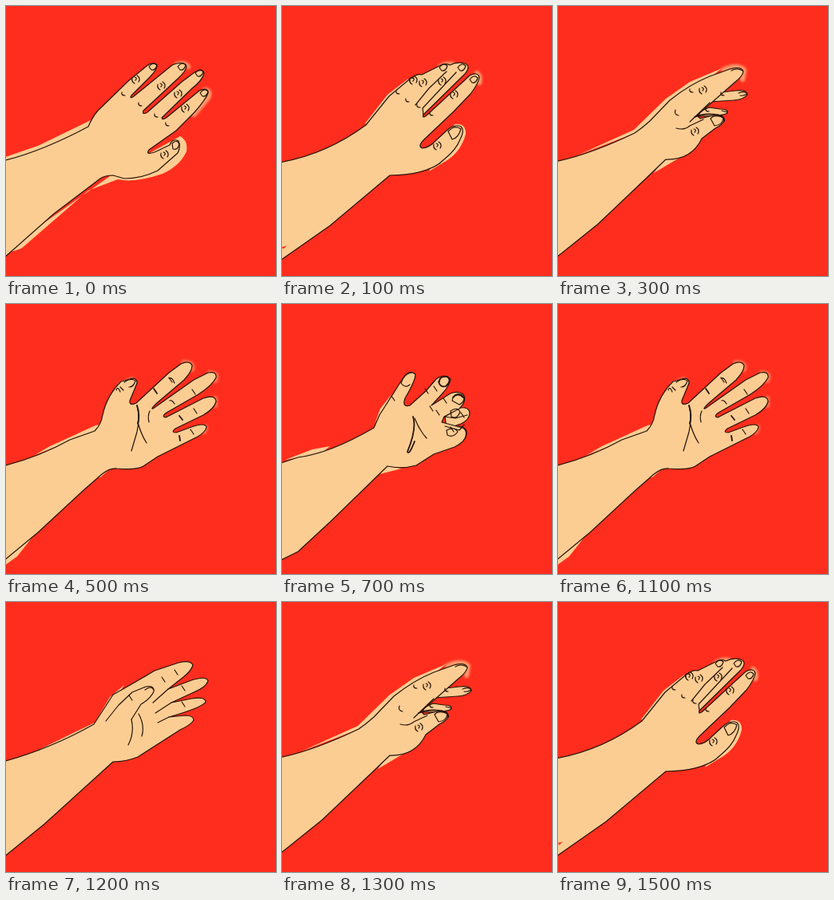
Write an HTML page without scripts that moves like this. It is 338 by 338 pixels and loops after 1600 ms.

```html
<!DOCTYPE html>
<html lang="en">
<head>
<meta charset="utf-8">
<title>Turning hand</title>
<style>
  html, body { margin: 0; width: 100%; height: 100%; overflow: hidden; background: #ff2d1d; }
  .strip { display: flex; width: 3042px; animation: play 1.6s steps(8) infinite; }
  /* nine poses, there and back */
  @keyframes play { 50% { transform: translateX(-2704px); } }
  .strip svg { flex: none; width: 338px; height: 338px; }
  .defs { position: absolute; width: 0; height: 0; }
  path { fill: none; stroke: #26130a; stroke-width: 1.2; stroke-linejoin: round; stroke-linecap: round; }
  marker { overflow: visible; }
  .skin { fill: #fccd93; }
  .spill { fill: #fccd93; stroke: none; filter: blur(.7px); }
  .glow { stroke: #fccd93; stroke-width: 6; opacity: .7; filter: blur(1.4px); }
  .bold { stroke-width: 1.8; }
  .wrinkles, .knuckles, .nails, .ticks { stroke: none; marker: var(--mark); }
  .wrinkles { --mark: url(#wrinkle); }
  .knuckles { --mark: url(#knuckle); }
  .nails { --mark: url(#nail); }
  .ticks { --mark: url(#tick); }
</style>
</head>
<body>
<svg class="defs">
  <marker id="wrinkle" markerUnits="userSpaceOnUse"><path d="M-4-2q-1 5 3 7M-1-3q4 1 1 4M2-5q5 3 2 8"/></marker>
  <marker id="knuckle" markerUnits="userSpaceOnUse"><path d="M-2-2q-1 4 4 4"/></marker>
  <marker id="nail" markerUnits="userSpaceOnUse"><path d="M-5 0Q0-7 5-2 3 5-2 4Z"/></marker>
  <marker id="tick" markerUnits="userSpaceOnUse"><path d="M-2-3l4 6"/></marker>
</svg>

<div class="strip">
  <!-- back of the hand, fingers spread -->
  <svg>
    <path class="spill" d="M-4 190L40 175 106 143V158L0 198ZM218 163Q228 168 226 182 218 200 196 210 160 222 140 217L103 231 20 303Q10 308-4 308L140 206Z"/>
    <path class="glow" d="M214 73Q224 70 228 76M249 105Q257 106 253 115L235 136"/>
    <path class="skin" d="M-4 194Q45 182 103 151 108 139 115 131L153 94 175 76Q183 69 189 74 189 80 180 89L157 112Q154 117 160 113L208 74Q222 68 226 75 226 81 215 91L172 131Q170 137 177 133L220 95 236 83Q246 78 248 84 246 93 233 103L195 140Q196 144 203 138L242 106Q253 101 253 109 250 117 236 133L213 156 179 180Q174 187 186 183L205 174Q208 165 216 169 219 176 215 184L190 206Q170 216 148 216L134 212Q124 212 118 216L60 260 0 313-4 316Z"/>
    <path class="nails" d="M184 76L220 76 242 84 248 109"/>
    <path d="M208 172Q214 166 217 173 215 181 209 179Z"/>
    <path class="wrinkles" d="M162 92L194 100 215 110 224 128 198 186"/>
    <path class="knuckles" d="M147 110L168 123 188 137 202 148"/>
  </svg>

  <!-- back of the hand, fingers closing -->
  <svg>
    <path class="spill" d="M104 147L132 111 158 91 160 100 112 150ZM216 148Q230 146 230 160 224 184 202 196L184 207Z"/>
    <path class="glow" d="M198 76Q206 71 214 73M244 84Q249 88 247 96"/>
    <path class="skin" d="M-4 196Q55 186 105 149L134 113 158 93Q168 84 175 86L197 75Q204 71 210 74 220 69 229 72 237 75 229 85L177 136Q175 142 182 136L235 87Q245 82 247 89 246 97 236 110L215 132 178 167Q169 176 176 178 185 177 193 168L206 156Q216 147 224 151 229 155 223 167 218 180 203 192 185 211 135 212L60 275 0 317-4 319Z"/>
    <path class="nails" d="M202 77L225 77 240 92"/>
    <path d="M208 157Q216 148 224 154 221 165 213 167ZM167 124L184 103 206 82M177 136L176 128 218 83M160 94Q158 89 165 90"/>
    <path class="wrinkles" d="M164 93L176 96 200 94 215 111 194 175"/>
    <path class="knuckles" d="M145 108L157 118 171 125 187 135"/>
    <path d="M-1 302L6 300 2 304Z" style="fill:#ff2d1d;stroke:none"/>
  </svg>

  <!-- turning edge-on -->
  <svg>
    <path class="spill" d="M70 169L104 147 135 113 165 95 105 155ZM212 142Q222 144 218 155L198 178 184 187Z"/>
    <path class="skin" d="M-4 196Q55 182 103 152L137 114 163 96 214 75Q229 70 234 77 234 82 219 98L234 93Q244 91 243 97 240 105 226 114L190 141 174 159Q169 166 178 163L205 143Q216 140 218 147 216 158 203 170L184 188Q160 203 136 202L56 273 0 315-4 318Z"/>
    <path class="nails" d="M227 79L238 97 211 149"/>
    <path d="M226 90L178 132"/>
    <path class="wrinkles" d="M168 100L193 94 187 167"/>
    <path class="knuckles" d="M149 124L160 131"/>
  </svg>

  <!-- edge-on, thumb in front -->
  <svg>
    <path class="spill" d="M24 187L95 155 135 116 165 95 205 78 112 153ZM132 192L152 190 120 209Z"/>
    <path class="glow" d="M207 80Q224 72 233 80L231 92"/>
    <path class="skin" d="M180 119L204 108 222 106Q236 104 237 111 233 117 220 118L189 120ZM178 132L189 127 203 129Q213 129 212 134 207 138 176 138Z"/>
    <path class="skin" d="M-4 195Q40 186 96 159 105 153 115 144L140 118Q165 98 190 88L215 79Q230 75 232 82 231 88 222 95L174 137 178 141 194 137Q207 135 208 143 206 149 197 153L180 166Q167 193 135 192L110 216 50 273 0 313-4 316Z"/>
    <path d="M217 81Q224 77 231 81M226 109Q234 106 237 110 232 113 228 112M205 131L212 133M191 141Q196 135 207 140 206 149 196 150ZM190 121L165 145M148 153Q158 156 165 150L182 142M147 130Q145 136 151 137"/>
    <path class="bold" d="M171 139Q183 134 197 136 209 137 208 144"/>
    <path class="wrinkles" d="M181 105L171 157"/>
    <path class="knuckles" d="M167 106L206 110 187 130"/>
  </svg>

  <!-- thumb lifting -->
  <svg>
    <path class="spill" d="M35 188L82 165 111 151 130 119 148 104 112 158Z"/>
    <path class="skin" d="M-4 200Q55 184 110 153L134 116 157 103 186 86 216 76Q231 72 234 79 232 86 222 94L203 109 232 98Q251 92 253 99 250 107 235 113L207 126 232 121Q249 118 250 125 246 132 204 144L224 142Q235 142 235 148 231 154 218 160L165 194Q150 200 134 200L48 278 0 317-4 320Z"/>
    <path class="skin" d="M125 149L141 129 158 113 175 106Q186 104 185 112 181 121 169 128L157 147"/>
    <path d="M174 110Q182 104 185 110M203 109L184 126M207 126L187 139M204 144L190 151M157 147Q161 164 153 179M166 140Q174 154 170 168"/>
    <path class="ticks" d="M197 97L213 88 222 108 222 128 156 120"/>
  </svg>

  <!-- open palm -->
  <svg>
    <path class="spill" d="M36 189L55 178 112 152 122 150 112 160ZM-4 320L40 283 14 316-4 329ZM110 216L133 204 118 217Z"/>
    <path class="glow" d="M143 101L158 94M222 73Q235 72 233 82M255 86Q267 87 262 96M262 118L262 127M250 154L248 160" style="opacity:.45"/>
    <path class="skin" d="M-4 203Q40 192 80 170L111 159Q119 151 121 139 126 115 144 97L155 94Q164 91 164 99L155 121Q154 128 163 124L204 86 219 75Q230 70 233 77 233 84 223 95L190 123Q180 132 184 131L235 95 253 86Q264 84 263 92 258 102 241 113L201 136Q194 141 200 142L247 118Q262 113 263 122 261 131 247 139L212 156Q206 161 213 161L232 154Q249 148 251 154 250 160 240 166L190 191 172 203Q164 208 139 206 130 205 120 213L95 235 40 286 0 319-4 322Z"/>
    <path d="M148 98Q156 92 162 96 160 104 154 104M138 108Q140 102 143 110M143 104L147 108M164 127Q168 142 164 160L157 184M165 148Q169 163 176 174M180 134Q177 140 179 148M204 93Q208 91 211 99M205 121Q207 119 211 125"/>
    <path class="bold" d="M164 127Q168 139 165 150M185 106L189 112M217 140L221 145M217 165L218 171"/>
    <path class="ticks" d="M206 95L235 110 237 134 233 160"/>
  </svg>

  <!-- fingers starting to curl -->
  <svg>
    <path class="spill" d="M18 195L50 181 113 152 110 162ZM-4 321L42 282 20 308-4 325Z"/>
    <path class="skin" d="M-4 202Q55 188 113 157L121 141 137 108 153 95Q164 87 165 97L154 123Q155 130 163 125L202 86Q216 76 222 82 224 91 211 105L184 130 232 101Q245 97 246 105 243 114 228 125L204 140 242 124Q252 124 250 132 247 140 209 159L229 153Q241 150 242 157 240 166 226 174L168 204Q150 208 137 205L119 213 50 279 0 320-4 323Z"/>
    <path d="M152 96Q158 91 164 96 162 105 156 105M208 85Q216 80 221 86 215 94 209 92M165 130Q169 145 158 185M166 149Q169 163 176 173M180 134L179 146"/>
    <path class="ticks" d="M141 112L188 111 198 102 211 123 222 115 225 137 220 163"/>
  </svg>

  <!-- fingers half curled -->
  <svg>
    <path class="spill" d="M4 195L38 182 60 178 48 188ZM116 150L123 131 138 112ZM118 214L132 202 150 206Z"/>
    <path class="skin" d="M208 158L221 153Q232 154 231 163 229 171 222 175L206 180ZM204 141L220 131Q233 127 235 136 235 145 224 150L206 156Z"/>
    <path class="skin" d="M-4 200L20 192Q60 187 115 155L122 139 140 111 152 92Q160 81 167 88 167 96 154 118 150 130 160 127L180 109 193 94Q204 86 211 94 210 102 200 113L187 127 206 115Q217 107 227 113 232 121 222 131L203 141 200 148 222 154Q234 156 229 168 226 174 216 179L190 188 168 202Q150 207 132 203L60 273 20 310 0 320-4 323Z"/>
    <path d="M149 99Q153 87 162 86M149 99Q154 106 160 101M213 121Q215 110 226 114 231 121 222 126ZM211 134Q219 128 223 135 219 145 212 141ZM206 158Q216 153 220 160 214 168 207 164ZM166 143Q172 158 181 168M203 141L217 143 232 139M204 153L222 158 228 151"/>
    <path class="bold" d="M164 141Q169 156 157 185 159 190 166 172M197 97Q197 90 207 91 213 96 205 103 198 105 196 97M214 117Q220 110 227 117"/>
    <path class="ticks" d="M139 118L181 109 192 106 187 131 195 136 204 121 213 157 226 139"/>
  </svg>

  <!-- fingers curled in -->
  <svg>
    <path class="spill" d="M0 196L44 182 88 166 74 178ZM-4 324L40 290 18 316-4 331Z"/>
    <path class="skin" d="M-4 200Q60 187 115 154L123 137 151 94Q159 83 167 90 168 98 155 121 154 130 162 126L187 104Q200 99 204 108 204 115 198 120 214 111 220 127 220 131 214 137 226 138 225 147 223 154 218 157 227 162 222 171 215 179 203 183L166 203Q149 207 133 204L60 275 0 325-4 328Z"/>
    <path d="M149 100Q153 89 162 88M184 112Q188 103 198 108 202 115 193 121L180 131Q173 135 175 127ZM198 120L185 133Q180 142 189 143L214 137 191 149Q186 155 194 158L218 157 196 164M165 150Q169 164 178 172"/>
    <path class="bold" d="M163 141Q168 157 157 185"/>
    <path class="nails" d="M209 128L214 146 211 167"/>
    <path class="ticks" d="M139 118L181 128"/>
  </svg>
</div>
</body>
</html>
```
